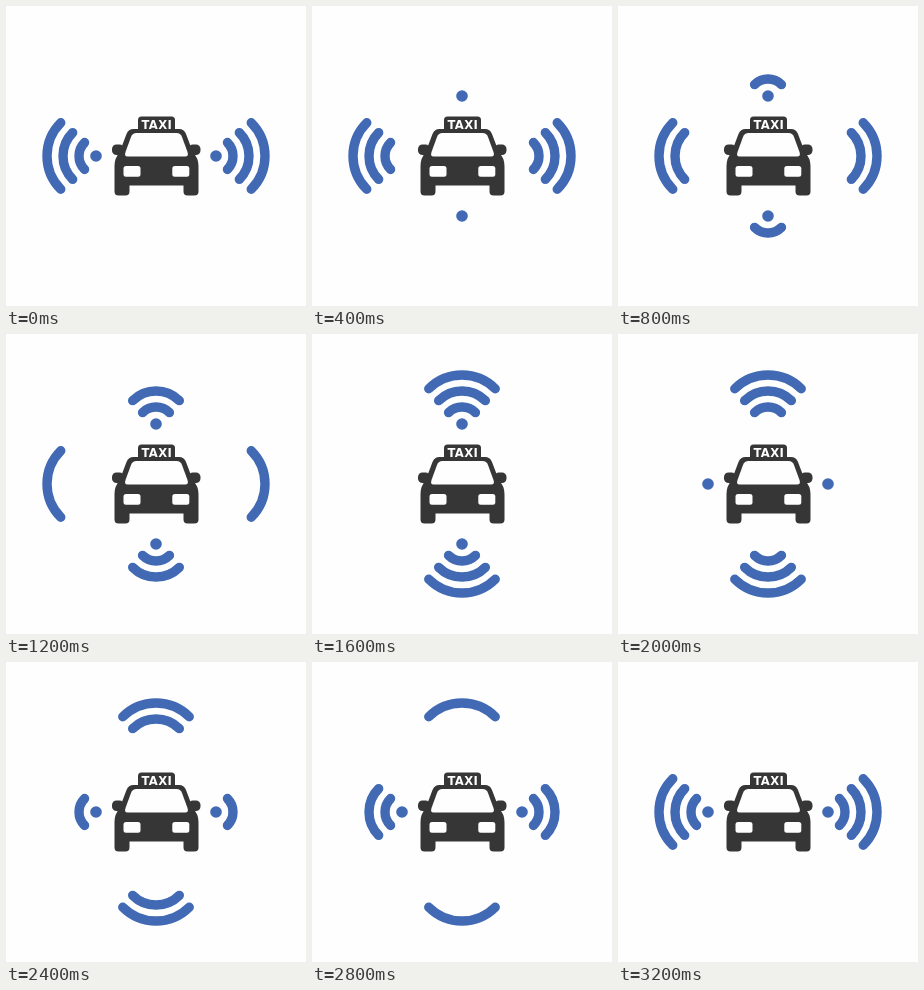
Recreate the animation shown at these times as an HTML page. Size 300x300 px, loop 3.6 s.

```html
<!DOCTYPE html>
<html lang="en">
<head>
<meta charset="utf-8">
<title>Taxi signal</title>
<style>
  html, body { margin: 0; width: 100%; height: 100%; overflow: hidden; background: #fefefe; }
  svg { display: block; width: 100vw; height: 100vh; }
  text { font: 700 11.6px "DejaVu Sans", sans-serif; letter-spacing: .4px; }
</style>
</head>
<body>
<svg viewBox="0 0 300 300">
  <g id="waves" fill="none" stroke="#4169b4" stroke-width="9.4" stroke-linecap="round"></g>
  <g fill="#363636">
    <rect x="132" y="110.5" width="37" height="17" rx="3.5"/>
    <rect x="106" y="138.5" width="12" height="10.5" rx="4.5"/>
    <rect x="182.5" y="138.5" width="12" height="10.5" rx="4.5"/>
    <path d="M127.5 123H173Q178 123 180 128L187 146.5Q192.5 152 192.5 160V185.5Q192.5 189.5 188.5 189.5H181.5Q177.5 189.5 177.5 185.5V179.5H123.5V185.5Q123.5 189.5 119.5 189.5H112.5Q108.5 189.5 108.5 185.5V160Q108.5 152 113.5 146.5L120.5 128Q122.5 123 127.5 123Z"/>
  </g>
  <g fill="#fefefe">
    <path d="M130.5 127H170.5Q174.5 127 176 131L181.5 146Q183 150.5 179 150.5H121.5Q118 150.5 119.5 146L125 131Q126.5 127 130.5 127Z"/>
    <rect x="117.5" y="160" width="17" height="10.8" rx="2.5"/>
    <rect x="166.3" y="160" width="17" height="10.8" rx="2.5"/>
    <text x="150.8" y="122.6" text-anchor="middle">TAXI</text>
  </g>
</svg>
<script>
const STEP = 400, STEPS = 9;
const waves = document.getElementById('waves');

// Part 0 is the dot, parts 1 to 3 are quarter arcs above it.
function part(i) {
  if (!i) return '<circle cx="150" cy="90" r="5.8" fill="#4169b4" stroke="none"/>';
  const r = 5 + 14 * i, d = r * Math.SQRT1_2, y = 94 - 2 * i - d;
  return `<path d="M${150 - d} ${y}A${r} ${r} 0 0 1 ${150 + d} ${y}"/>`;
}

// Each part is drawn at two opposite sides of the car.
function pair(i, angle) {
  return [angle, angle + 180]
    .map(a => `<g transform="rotate(${a} 150 150)">${part(i)}</g>`).join('');
}

let last = -1;
function frame(now) {
  const step = Math.floor(now / STEP) % STEPS;
  if (step !== last) {
    last = step;
    // The growing direction fills from the dot outwards while the other empties.
    const sideways = step === 0 || step > 4;
    const count = step === 0 ? 4 : (step - 1) % 4 + 1;
    waves.innerHTML = [0, 1, 2, 3]
      .map(i => pair(i, (i < count) === sideways ? 90 : 0)).join('');
  }
  requestAnimationFrame(frame);
}
frame(performance.now());
</script>
</body>
</html>
```
